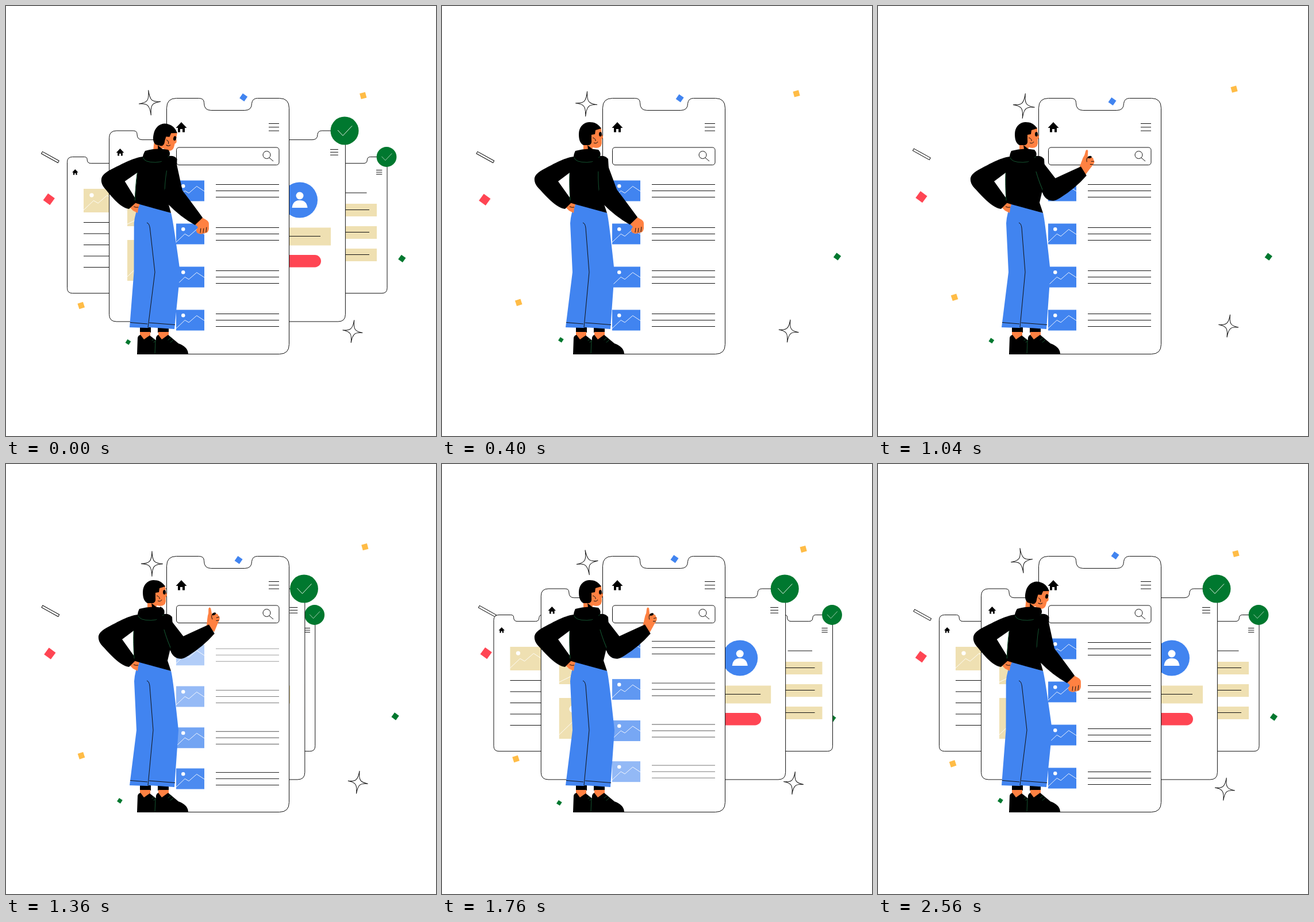
Animation of 748 by 748 pixels, one loop 2640 ms. Source, as an HTML page:

```html
<!DOCTYPE html>
<html lang="en">
<head>
<meta charset="utf-8">
<title>App screens</title>
<style>
  html, body { margin: 0; width: 100%; height: 100%; overflow: hidden; background: #fff; }
  svg { display: block; width: 100vw; height: 100vh; }
  .ln { fill: none; stroke: #111; stroke-width: 1; }
  .wl { fill: none; stroke: #fff; stroke-width: .9; }
  .gl { fill: none; stroke: #14522f; stroke-width: 1; stroke-linecap: round; }
  .shell { fill: #fff; stroke: #111; stroke-width: 1; vector-effect: non-scaling-stroke; }
  .skin { fill: #ff8142; }
  .tan { fill: #efe0b2; }
  .blue { fill: #4184f0; }
  .green { fill: #00782f; }
  .red { fill: #ff4553; }
  .yellow { fill: #ffbc46; }
</style>
</head>
<body>
<svg viewBox="0 0 748 748" xmlns="http://www.w3.org/2000/svg">
  <defs>
    <path id="shell" class="shell" d="M17 0H56Q65 0 65 8Q65 21 77 21H136Q148 21 148 9Q149 0 158 0H196Q213 0 213 17V428Q213 445 196 445H17Q0 445 0 428V17Q0 0 17 0Z"/>
    <path id="house" d="M-9.5 1L0-9L9.5 1H6V8.5H2V3H-2V8.5H-6V1Z"/>
  </defs>
  <g id="confetti"></g>
  <g id="farL"></g>
  <g id="farR"></g>
  <g id="midL"></g>
  <g id="midR"></g>
  <g id="front"></g>
  <g id="person">
    <path d="M233 558H252V568H233ZM264 558H283V568H264Z"/>
    <path class="skin" d="M233 567H251V574L240 581L233 574ZM265 567H283V574L271 581L265 574Z"/>
    <path d="M228 606L229 577Q230 573 234 572L240 580L250 573L264 584V606Z"/>
    <path d="M259 606L261 577Q262 573 265 572L271 580L282 572L300 587Q317 593 317 606Z"/>
    <path class="gl" d="M259 605L260 582M254 582l4-3M257 585l3-2M282 581l5-4M286 585l5-4"/>
    <path class="body skin" d="M246 238L262 240L262 253L246 253Z"/>
    <path class="body" d="M253 242L263 250L254 249Z"/>
    <g id="head">
      <path class="skin" d="M260 212H277L278 223Q282 229 278 232V239Q277 247 268 247Q258 246 254 240Z"/>
      <path d="M277 213C272 205 265 202 257 202C246 202 238 211 238 223C238 232 240 239 246 242L256 242Q261 240 260 233V224L266 223L267 216Z"/>
      <circle class="skin" cx="264" cy="230" r="4"/>
      <path class="ln" d="M262 229Q268 231 267 235M264 238Q269 240 271 236"/>
      <ellipse id="eye" cx="275.5" cy="223" rx="2.5"/>
    </g>
    <path class="body blue" d="M232 343L287 360Q290 368 300 463L293 562L249 559L246 560L215 559L227 463L223 378Q224 360 232 343Z"/>
    <path class="body ln" d="M245 377Q249 378 250 386L256 463L247 559"/>
    <path class="ln" d="M216 550.5L246 553M249 551L294 554.5"/>
    <path class="body skin" d="M215 350L225 341L232 345L230 352L229 360L221 356Z"/>
    <path class="body ln" d="M222 349Q226 351 230 350"/>
    <path class="body" d="M232 252C229 258 229 262 229 262C222 263 212 265 190 277C176 284 163 290 161 299C160 307 164 313 170 319C182 332 200 352 214 353L227 340L202 305L222 290L222 342L232 345L287 360L281 342L291 300L289 266Q284 260 275 261Q277 255 272 250Q252 246 232 252Z"/>
    <path class="body gl" d="M230 264Q232 272 252 272Q271 271 274 262"/>
    <path class="body gl" d="M222 291Q221 310 223 338"/>
    <g id="fist">
      <path class="skin" d="M4-7L13-2Q18 1 18 5V14Q17 20 13 21L8 22Q4 24 0 22Q-4 21-4 16L-1 11L-7 5Z"/>
      <path class="ln" d="M4 13L3 21M9 13L8 21M14 11L13 20"/>
    </g>
    <g id="point">
      <path class="skin" d="M-8-4L-5-18Q-4-24-2-28L-1-36Q1-40 3-36L4-26Q8-30 10-26Q14-27 15-22Q18-20 16-15L12-8L5 5Z"/>
      <path class="ln" d="M4-25Q2-21 4-17M11-19L16-20M10-14L15-14"/>
      <ellipse cx="7.5" cy="-26" rx="3.5" ry="2" transform="rotate(-20 7.5 -26)"/>
    </g>
    <g id="upper">
      <path d="M0-14L52-17A17 17 0 0 1 52 17L0 14A14 14 0 0 1 0-14Z"/>
      <path class="gl" d="M9 5Q30 12 50 15"/>
    </g>
    <path id="fore" d="M0-17Q20-15 64-9V9.500Q36 18 5 18H0A17.500 17.500 0 0 1 0-17Z"/>
  </g>
</svg>
<script>
const LOOP = 2640, STEP = 80;
const $ = id => document.getElementById(id);
const clamp = (v, lo = 0, hi = 1) => Math.max(lo, Math.min(hi, v));
const mix = (a, b, k) => a + (b - a) * k;
const place = (node, x, y, turn = 0) =>
  node.setAttribute('transform', `translate(${x} ${y}) rotate(${turn})`);

// Ease through [time, value] points; an interior point that is no extreme keeps its speed.
function track(points) {
  const slope = i => {
    const a = points[i], b = points[i + 1];
    return a && b ? (b[1] - a[1]) / (b[0] - a[0]) : 0;
  };
  const speed = i => {
    const a = slope(i - 1), b = slope(i);
    return a * b > 0 ? 2 * a * b / (a + b) : 0;
  };
  return t => {
    let i = points.length - 1;
    while (i > 0 && points[i][0] > t) i--;
    if (!points[i + 1] || t < points[0][0]) return points[i][1];
    const [t0, a] = points[i], [t1, b] = points[i + 1];
    const h = t1 - t0, u = (t - t0) / h, v = 1 - u;
    return a * (1 + 2 * u) * v * v + speed(i) * h * u * v * v
         + b * u * u * (3 - 2 * u) - speed(i + 1) * h * u * u * v;
  };
}

// One slow swing per loop, largest at the given time.
const swing = (base, size = 0, peak = 0) =>
  t => base + size * Math.cos((t - peak) / LOOP * 2 * Math.PI);

// Drifting shapes
const square = (cls, s) => `<rect class="${cls}" x="${-s / 2}" y="${-s / 2}" width="${s}" height="${s}"/>`;
const star = (w, h) => `<path class="ln" d="M0 ${-h}C.5-4 4-.5 ${w} 0C4 .5 .5 4 0 ${h}C-.5 4-4 .5 ${-w} 0C-4-.5-.5-4 0 ${-h}Z"/>`;
const bits = [];
function bit(art, x, y, turn) {
  const node = document.createElementNS('http://www.w3.org/2000/svg', 'g');
  node.innerHTML = art;
  $('confetti').append(node);
  bits.push(t => place(node, x(t), y(t), turn(t)));
}
bit(square('blue', 10), swing(409, 5, 250), swing(163, 4, 1350), swing(35));
bit(square('yellow', 10), swing(622.5, 6.5, 1900), swing(150, 6, 2560), swing(-15));
bit(square('yellow', 10), swing(131, 3, 700), swing(514, 7.5, 2480), swing(-18));
bit(square('red', 14.5), swing(75.5, 1.2, 1700), swing(333, 4, 300), swing(36));
bit(square('green', 9.5), swing(683, 6, 100), swing(439, 4, 2020), swing(36));
bit(square('green', 7), swing(205, 8, 2480), swing(585, 5, 1950), swing(33));
bit('<rect class="ln" x="-16.5" y="-2" width="33" height="4"/>', swing(77, 2, 1950), swing(259.5, 4, 200), swing(29));
bit(star(19, 22), swing(252, 2, 1250), swing(171, 3, 1150), swing(-2.5, 11, 800));
bit(star(17.5, 20), swing(607.5, 5, 1500), swing(560, 6.5, 150), swing(8));

// Screens
const box = (cls, x, y, w, h, r = 0) => `<rect class="${cls}" x="${x}" y="${y}" width="${w}" height="${h}" rx="${r}"/>`;
const rows = (x1, x2, y, count = 1, gap = 0) => Array.from({ length: count },
  (_, i) => `<path class="ln" d="M${x1} ${y + gap * i}H${x2}"/>`).join('');
const phone = (x, y, s) => `<use href="#shell" transform="translate(${x} ${y}) scale(${s})"/>`;
const house = (x, y, s) => `<use href="#house" transform="translate(${x} ${y}) scale(${s})"/>`;
const menu = (x, y, s) => rows(x, x + 18 * s, y, 3, 6.3 * s);
const picture = (cls, x, y, w, h) => box(cls, x, y, w, h)
  + `<circle cx="${x + w * .25}" cy="${y + h * .27}" r="${h * .09}" fill="#fff"/>`
  + `<path class="wl" d="M${x} ${y + h * .9}l${w * .31} ${-h * .4}l${w * .14} ${h * .11}l${w * .28} ${-h * .33}l${w * .27} ${h * .24}"/>`;
const badge = (x, y, s) => `<g transform="translate(${x} ${y}) scale(${s})"><circle class="green" r="24.5"/><path class="wl" d="M-12-1L-3 8.5L13-8.500"/></g>`;
const bar = y => box('tan', 567, y, 78, 22) + rows(580, 632, y + 10.5);

$('farL').innerHTML = phone(106.5, 262.5, .533) + house(120.3, 289, .55)
  + picture('tan', 135, 318, 56, 41) + rows(135, 191, 376.5, 5, 19.5);
$('farR').innerHTML = phone(549.5, 262.5, .533) + menu(644, 285.5, .57) + rows(585, 627.5, 325)
  + [0, 1, 2].map(i => bar(344 + 39 * i)).join('') + badge(662, 262.5, .71);
$('midL').innerHTML = phone(179.5, 217, .746) + house(198.5, 254.5, .72)
  + picture('tan', 211, 347, 96, 36) + picture('tan', 211, 407, 96, 71);
$('midR').innerHTML = phone(431.5, 217, .746) + menu(564, 249.5, .77)
  + '<circle class="blue" cx="511" cy="337.5" r="31"/><circle cx="511" cy="330" r="6.5" fill="#fff"/>'
  + '<path d="M497.5 351Q499 338 511 338Q523 338 524.5 351Z" fill="#fff"/>'
  + box('tan', 456, 385.5, 109, 31) + rows(474, 547, 400.5)
  + box('red', 473, 433, 75, 21.5, 10.7) + badge(589, 217, 1);

const entry = i => {
  const y = 303.5 + 75 * i;
  return `<g class="entry">${picture('blue', 296, y, 49, 36)}${rows(365, 475, y + 7, 3, 11)}</g>`;
};
$('front').innerHTML = phone(279.5, 160.5, 1) + house(305, 211, 1) + menu(457, 204.5, 1)
  + box('ln', 296.5, 246, 178.5, 30.5, 4.5)
  + '<circle class="ln" cx="453.5" cy="259" r="6.5"/><path class="ln" d="M458 264L465 270"/>'
  + [0, 1, 2, 3].map(entry).join('');
const entries = [...document.querySelectorAll('.entry')];

// The back screens slide away, then spring out past their place.
const slide = (hidden, late, over) => track([[0, 0], [360, hidden], [1200, hidden],
  [1520, late], [1745, -over], [2000, over * .15], [2240, 0]]);
const mid = slide(130, 4, 7.3);
const far = slide(206, 23, 16.7);

const lean = track([[0, 1], [360, 0], [1760, 0], [2000, 1.12], [2240, 1]]);
const raise = track([[560, 0], [960, 1], [1760, 1], [2000, 0]]);
const blink = track([[1760, 1], [2000, .2], [2160, 1]]);

// Leaning shifts the chest forward and spreads the knees.
function bend(x, y, k) {
  const chest = Math.max(0, 352 - y) * .1;
  const knee = clamp(1 - Math.abs(y - 463) / 90) * clamp((x - 242) * .3, -5, 3);
  return x + k * (chest + knee);
}
const body = [...document.querySelectorAll('.body')].map(node => ({ node, d: node.getAttribute('d') }));

const reach = ([x, y], len, deg) => {
  const a = deg * Math.PI / 180;
  return [x + len * Math.cos(a), y + len * Math.sin(a)];
};

function drawPerson(t) {
  const k = lean(t), r = raise(t);
  for (const { node, d } of body)
    node.setAttribute('d', d.replace(/([\d.]+) ([\d.]+)/g, (_, x, y) => `${bend(+x, +y, k).toFixed(2)} ${y}`));
  $('head').setAttribute('transform', `translate(${19 * k} ${2.5 * k}) rotate(${15 * k} 257 222)`);
  $('eye').setAttribute('ry', 4 * blink(t));

  const upTurn = mix(73 + 8 * k, 55.5, r), foreTurn = mix(46, -32, r);
  const tap = 9 * Math.cos((t - 1000) / 1000 * 2 * Math.PI);
  const shoulder = [274 + 9 * k, 278 - k];
  const elbow = reach(shoulder, 52, upTurn);
  const wrist = reach(elbow, 63, foreTurn);
  place($('upper'), ...shoulder, upTurn);
  place($('fore'), ...elbow, foreTurn);
  place($('fist'), ...wrist, foreTurn - 46);
  place($('point'), ...wrist, foreTurn + 32 + tap);
  $('fist').style.display = r > .5 ? 'none' : '';
  $('point').style.display = r > .5 ? '' : 'none';
}

// Old rows sink and fade, then new rows drop in, each a little later.
function drawList(t) {
  entries.forEach((node, i) => {
    const enter = (t - 1560 - 35 * i) / 280;
    const leave = (t - 1220 - 43 * i) / 380;
    const entering = enter >= 0;
    const rest = (1 - clamp(entering ? enter : leave)) ** 2;
    place(node, 0, entering ? -26 * rest : 18 * (1 - rest));
    node.setAttribute('opacity', entering ? 1 - rest : rest);
  });
}

function draw(t) {
  bits.forEach(move => move(t));
  place($('midL'), mid(t), 0);
  place($('midR'), -mid(t), 0);
  place($('farL'), far(t), 0);
  place($('farR'), -far(t), 0);
  drawList(t);
  drawPerson(t);
}

const start = performance.now();
function tick() {
  const t = (performance.now() - start) % LOOP;
  draw(Math.floor(t / STEP) * STEP);
  requestAnimationFrame(tick);
}
tick();
</script>
</body>
</html>
```
